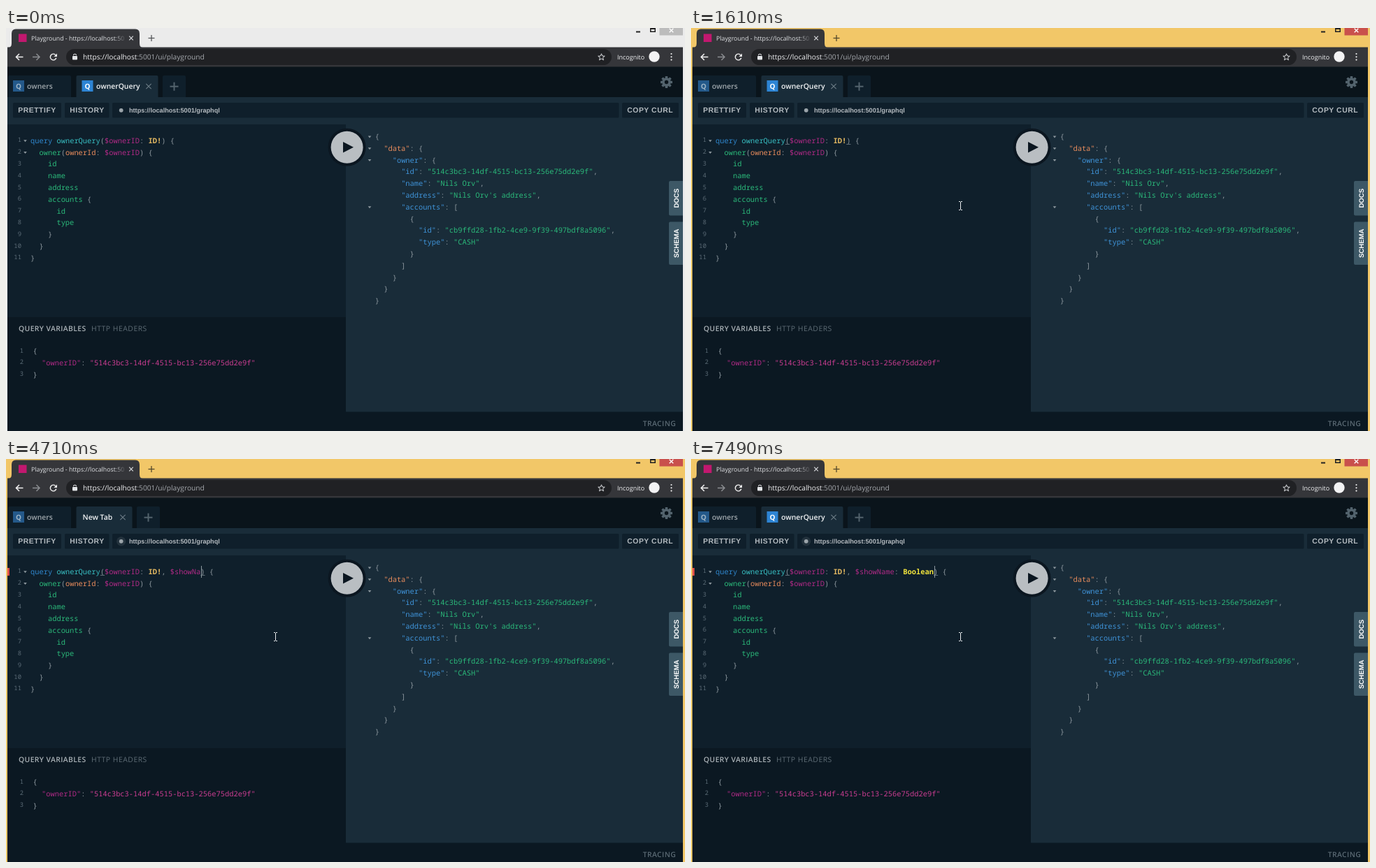
An HTML page with a canvas for the animation above (8 s loop, 971 px wide and 577 px high).

```html
<!DOCTYPE html>
<html lang="en">
<head>
<meta charset="utf-8">
<title>Playground</title>
<style>
html, body { margin: 0; width: 971px; height: 577px; overflow: hidden; background: #0b1924; }
canvas { display: block; }
</style>
</head>
<body>
<canvas id="stage" width="971" height="577"></canvas>
<script>
const g = document.getElementById('stage').getContext('2d');
g.textRendering = 'geometricPrecision';

const LOOP = 8000, CW = 6.24, ROW = 16.79;
const MONO = '"Noto Sans Mono", "DejaVu Sans Mono", monospace';
const UI = '"Open Sans", "Noto Sans", sans-serif';
const ARIAL = '"Liberation Sans", Arial, sans-serif';

const BLUE = '#2f86cc', TEAL = '#38bdc1', PINK = '#b02a86', GREEN = '#2bb97a',
  ORANGE = '#e98c5c', GRAY = '#8a959c', TAN = '#e6bb62', YELLOW = '#f1e43c',
  KEY = '#3f93d8', DIM = '#5a6a75';
const PANEL = '#192c39', EDITOR = '#0f1f2b', DARK = '#0b1822', CHROME = '#35363a';

// Typed text, one character per key time
const TYPED = ', $showName: Boolean';
const KEYS = [2080, 2780, 3310, 3780, 3850, 3930, 4080, 4630, 4710, 4860, 5100,
  5640, 5870, 6020, 6260, 6870, 7040, 7190, 7340, 7490];
const FOCUS = 1070, POLLS = [1080, 3080, 5080, 7080];

const clamp = v => Math.max(0, Math.min(1, v));
const ease = v => { v = clamp(v); return v * v * (3 - 2 * v); };
const mix = (a, b, k) => a + (b - a) * k;

function box(x, y, w, h, color, r = 0) {
  g.fillStyle = color;
  g.beginPath();
  g.roundRect(x, y, w, h, r);
  g.fill();
}

function disc(x, y, r, color) {
  g.fillStyle = color;
  g.beginPath();
  g.arc(x, y, r, 0, Math.PI * 2);
  g.fill();
}

function poly(color, ...p) {
  g.fillStyle = color;
  g.beginPath();
  for (let i = 0; i < p.length; i += 2) g.lineTo(p[i], p[i + 1]);
  g.fill();
}

function line(color, width, ...p) {
  g.strokeStyle = color;
  g.lineWidth = width;
  g.beginPath();
  for (let i = 0; i < p.length; i += 2) g.lineTo(p[i], p[i + 1]);
  g.stroke();
}

function cross(x, y, r, color, width = 1) {
  line(color, width, x - r, y - r, x + r, y + r);
  line(color, width, x - r, y + r, x + r, y - r);
}

function plus(x, y, r, color, width) {
  line(color, width, x - r, y, x + r, y);
  line(color, width, x, y - r, x, y + r);
}

function text(s, x, y, font, color, spacing = 0, align = 'left') {
  g.font = font;
  g.fillStyle = color;
  g.letterSpacing = spacing + 'px';
  g.textAlign = align;
  g.fillText(s, x, y);
  g.letterSpacing = '0px';
}

// Code row made of color, text pairs; y is the middle of the row
function code(x, y, ...parts) {
  for (let i = 0; i < parts.length; i += 2) {
    const bold = parts[i] === TAN || parts[i] === YELLOW;
    text(parts[i + 1], x, y + 3.7, (bold ? 'bold ' : '') + '10.4px ' + MONO, parts[i]);
    x += parts[i + 1].length * CW;
  }
}

const rowNumber = (n, x, y) => text(n, x, y + 2.6, '8.9px ' + MONO, DIM, 0, 'right');
const fold = (x, y) => poly('#8d989f', x - 2.3, y - 1, x + 2.3, y - 1, x, y + 2);

function browserTab() {
  g.fillStyle = CHROME;
  g.beginPath();
  g.moveTo(3, 28);
  g.quadraticCurveTo(8, 28, 8, 22);
  g.lineTo(8, 8);
  g.quadraticCurveTo(8, 1.5, 14, 1.5);
  g.lineTo(185, 1.5);
  g.quadraticCurveTo(191, 1.5, 191, 8);
  g.lineTo(191, 22);
  g.quadraticCurveTo(191, 28, 196, 28);
  g.fill();
}

function browser(active) {
  const frame = active ? '#f2c768' : '#ebebeb';
  box(0, 0, 971, 577, frame);
  browserTab();
  box(2, 27.4, 966, 29, CHROME);
  box(18, 8.5, 11.5, 11.5, '#c2186f');
  text('Playground - https://localhost:50', 36, 17.6, '8.8px ' + UI, '#dfe1e4');
  const fade = g.createLinearGradient(155, 0, 170, 0);
  fade.addColorStop(0, 'rgba(53,54,58,0)');
  fade.addColorStop(1, 'rgba(53,54,58,.85)');
  box(155, 7, 16, 15, fade);
  cross(179, 14.5, 2.8, '#d5d7da', 1.2);
  plus(208, 14.5, 4.5, active ? '#54492c' : '#55575a', 1.3);

  box(901, 4.5, 6, 2, '#222');
  box(921, 0, 8, 6, '#222');
  box(922.5, 2, 5, 2.5, frame);
  box(934.5, 0, 33.5, 10.4, active ? '#c9504c' : '#bcbcbc');
  cross(951.5, 3.5, 2.8, '#fff', 1.3);

  line('#f1f1f1', 1.5, 24.5, 41.5, 14.5, 41.5);
  line('#f1f1f1', 1.5, 19, 37, 14.5, 41.5, 19, 46);
  line('#8b8d91', 1.5, 38, 41.5, 48, 41.5);
  line('#8b8d91', 1.5, 43.5, 37, 48, 41.5, 43.5, 46);
  g.strokeStyle = '#f1f1f1';
  g.lineWidth = 1.5;
  g.beginPath();
  g.arc(67.7, 41.5, 4.3, 0.3, 5.5);
  g.stroke();
  poly('#f1f1f1', 73, 36.5, 73, 41, 68.5, 41);

  box(86, 30, 780, 23, '#202124', 11.5);
  box(95, 40, 7, 5.5, '#e3e5e8', 1);
  g.strokeStyle = '#e3e5e8';
  g.lineWidth = 1.1;
  g.beginPath();
  g.arc(98.5, 39.3, 2, Math.PI, 0);
  g.stroke();
  text('https://localhost', 110, 45, '10.2px ' + UI, '#f0f1f3');
  text(':5001/ui/playground', 187.4, 45, '10.2px ' + UI, '#a5a9ae');

  g.strokeStyle = '#dcdee1';
  g.lineWidth = 1;
  g.beginPath();
  for (let i = 0; i < 10; i++) {
    const a = -Math.PI / 2 + i * Math.PI / 5, r = i % 2 ? 2.2 : 5;
    g.lineTo(851.5 + Math.cos(a) * r, 41.8 + Math.sin(a) * r);
  }
  g.closePath();
  g.stroke();
  text('Incognito', 874, 44.6, '9px ' + UI, '#f0f1f3');
  disc(927, 41, 7.7, '#f3f3f4');
  for (const y of [37, 41.3, 45.6]) disc(951.5, y, 1.1, '#f1f1f1');
}

function gear(x, y) {
  g.save();
  g.translate(x, y);
  for (let i = 0; i < 8; i++) {
    box(-1.8, -8.5, 3.6, 5, '#53636d', 0.6);
    g.rotate(Math.PI / 4);
  }
  g.restore();
  disc(x, y, 6.3, '#53636d');
  disc(x, y, 2.7, '#0a141b');
}

function badge(x, bg, fg) {
  box(x, 75, 16, 16, bg);
  text('Q', x + 8, 86.6, 'bold 10px ' + UI, fg, 0, 'center');
}

function tabs(named) {
  const w = named ? 117 : 80, label = '600 10.4px ' + UI;
  box(2, 55.5, 966, 44.5, '#0a141b');
  box(3, 68, 90, 31, EDITOR, [2, 2, 0, 0]);
  badge(10, '#24598a', '#9fb5c6');
  text('owners', 30, 86.8, label, '#a0a8ad');
  box(100.5, 68, w, 32, PANEL, [2, 2, 0, 0]);
  if (named) badge(108.5, '#2d84d4', '#fff');
  text(named ? 'ownerQuery' : 'New Tab', named ? 129 : 109.5, 86.8, label, '#f3f5f6');
  cross(87 + w, 83.5, 3.7, '#6d7c86', 1.1);
  box(107 + w, 68, 33, 31, EDITOR, [2, 2, 0, 0]);
  plus(123.5 + w, 83.7, 6, '#53636d', 2);
  gear(944.5, 77.5);
}

function toolbar(t) {
  box(2, 99, 966, 39, PANEL);
  const button = (s, x, w) => {
    box(x, 107, w, 21.5, EDITOR, 1.5);
    text(s, x + 7.2, 121.3, 'bold 10.4px ' + ARIAL, '#b3babf', 0.55);
  };
  button('PRETTIFY', 10, 69);
  button('HISTORY', 84, 63.5);
  button('COPY CURL', 881, 81);
  box(152, 107, 724.5, 21.5, EDITOR, 1.5);
  if (t > 3470) disc(164.7, 117.8, 6.6, 'rgba(139,149,156,.17)');
  for (const p of POLLS) {
    const k = (t - p) / 420;
    if (k >= 0 && k < 1) disc(164.7, 117.8, 3 + 3.6 * k, `rgba(139,149,156,${0.4 * (1 - k)})`);
  }
  disc(164.7, 117.8, 2.9, '#9ca5ab');
  text('https://localhost:5001/graphql', 176, 121, 'bold 9.15px ' + ARIAL, '#b5bbc0');
}

function editor(t, typed) {
  box(2, 138, 484, 276, EDITOR);
  const y = i => 161.2 + i * ROW;
  const shown = TYPED.slice(0, typed);
  const col = 30 + typed;
  code(35, y(0), BLUE, 'query ', TEAL, 'ownerQuery', GRAY, '(', PINK, '$ownerID', GRAY, ': ',
    TAN, 'ID!', GRAY, shown.slice(0, 2), PINK, shown.slice(2, 11), GRAY, shown.slice(11, 13),
    YELLOW, shown.slice(13), GRAY, ') {');
  code(35, y(1), GREEN, '  owner', GRAY, '(', ORANGE, 'ownerId', GRAY, ': ', PINK, '$ownerID', GRAY, ') {');
  ['id', 'name', 'address', 'accounts', '  id', '  type'].forEach((s, i) =>
    code(35, y(i + 2), GREEN, '    ' + s, GRAY, s === 'accounts' ? ' {' : ''));
  ['    }', '  }', '}'].forEach((s, i) => code(35, y(i + 8), GRAY, s));
  for (let i = 0; i < 11; i++) rowNumber(i + 1, 22, y(i) - 0.4);
  fold(27.5, y(0));
  fold(27.5, y(1));

  if (t >= 4630) box(2, 156, 3, 11, '#e0504a');
  if (t >= FOCUS) {
    for (const c of [16, col]) box(35 + c * CW, 166, CW, 1, '#5f6d76');
    const last = typed ? KEYS[typed - 1] : FOCUS;
    if ((t - last) % 1060 < 530) box(Math.round(35.9 + col * CW), 153, 1, 17, '#8d989f');
  }
}

function variables() {
  box(2, 413.5, 966, 163.5, DARK);
  text('QUERY VARIABLES', 18, 433.7, '600 10.4px ' + UI, '#a9b1b6', 0.38);
  text('HTTP HEADERS', 122, 433.7, '10.4px ' + UI, '#5f6d76', 0.5);
  text('TRACING', 910.7, 569.6, '600 10.4px ' + UI, '#5a6973', 0.4);
  code(38.6, 462.4, GRAY, '{');
  code(38.6, 479.2, PINK, '  "ownerID"', GRAY, ': ', '#cb3d92', '"514c3bc3-14df-4515-bc13-256e75dd2e9f"');
  code(38.6, 496, GRAY, '}');
  for (let i = 0; i < 3; i++) rowNumber(i + 1, 25, 462 + i * 16.8);
}

function result() {
  box(486, 138, 482, 411.5, PANEL);
  const y = i => 155.4 + i * ROW;
  const row = (i, indent, ...parts) => code(527.7 + indent * CW, y(i), ...parts);
  const pair = (i, indent, key, value, end) =>
    row(i, indent, KEY, `"${key}"`, GRAY, ': ', GREEN, `"${value}"`, GRAY, end);
  row(0, 0, GRAY, '{');
  row(1, 2, ORANGE, '"data"', GRAY, ': {');
  row(2, 4, KEY, '"owner"', GRAY, ': {');
  pair(3, 6, 'id', '514c3bc3-14df-4515-bc13-256e75dd2e9f', ',');
  pair(4, 6, 'name', 'Nils Orv', ',');
  pair(5, 6, 'address', "Nils Orv's address", ',');
  row(6, 6, KEY, '"accounts"', GRAY, ': [');
  row(7, 8, GRAY, '{');
  pair(8, 10, 'id', 'cb9ffd28-1fb2-4ce9-9f39-497bdf8a5096', ',');
  pair(9, 10, 'type', 'CASH', '');
  ['}', ']', '}', '}', '}'].forEach((s, i) => row(10 + i, 8 - 2 * i, GRAY, s));
  for (const i of [0, 1, 2, 6]) fold(520, y(i));

  const side = (s, top, h) => {
    box(948, top, 20, h, '#3d5866', [2, 0, 0, 2]);
    g.save();
    g.translate(961.6, top + h / 2);
    g.rotate(-Math.PI / 2);
    text(s, 0, 0, 'bold 9.6px ' + ARIAL, '#fff', 0, 'center');
    g.restore();
  };
  side('DOCS', 219, 49.5);
  side('SCHEMA', 277.5, 61.5);

  disc(487.6, 170.7, 27, '#0b1620');
  disc(487.6, 170.7, 23, '#b9bec2');
  poly('#0b1620', 482, 163, 497, 170.7, 482, 178.4);
}

function pointer(t) {
  if (t < 70) return;
  let x, y;
  if (t < 660) {
    const k = ease((t - 70) / 590);
    x = mix(437, 213, k);
    y = mix(417, 152, k);
  } else {
    const a = ease((t - 660) / 240), b = ease((t - 1130) / 330);
    x = mix(mix(213, 224.5, a), 385, b);
    y = mix(mix(152, 155, a), 254, b);
  }
  if (t >= FOCUS && t < 1190) disc(x - 1.5, y + 1, 9.3, 'rgba(215,195,10,.82)');
  x = Math.floor(x);
  y = Math.round(y);
  const c = '#e9edef';
  box(x, y - 5, 1, 11, c);
  for (const dy of [-6, 6]) {
    box(x - 2, y + dy, 2, 1, c);
    box(x + 1, y + dy, 2, 1, c);
  }
}

function draw(now) {
  const t = now % LOOP;
  const typed = KEYS.filter(k => k <= t).length;
  browser(t >= FOCUS);
  tabs(t < 3620 || t >= 6180);
  toolbar(t);
  variables();
  editor(t, typed);
  result();
  pointer(t);
}

let start;
function tick(now) {
  if (start === undefined) start = now;
  draw(now - start);
  requestAnimationFrame(tick);
}
requestAnimationFrame(tick);
</script>
</body>
</html>
```
